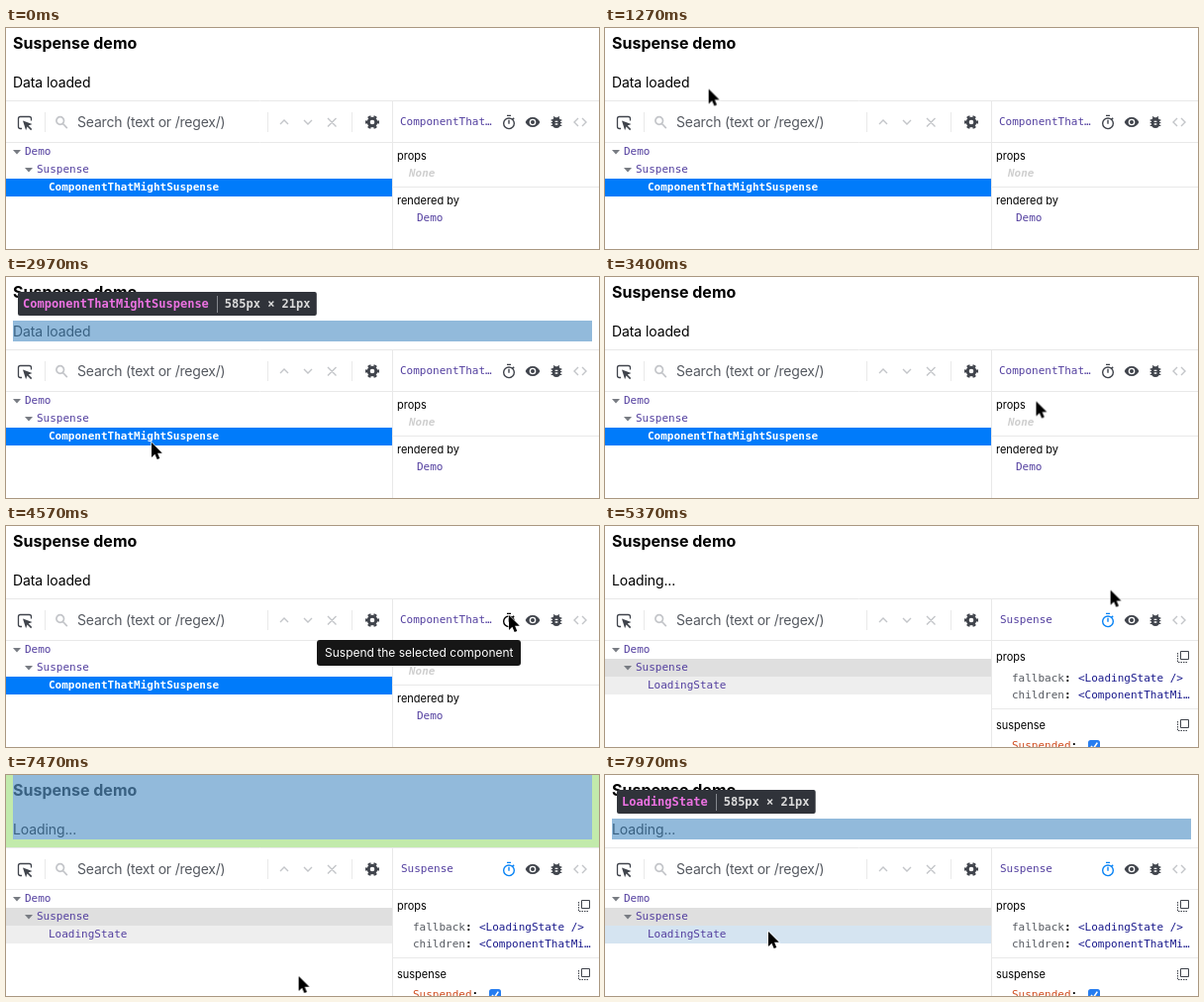
Recreate the animation shown at these times as an HTML page. Size 599 by 223 pixels, loop 8 s.

```html
<!DOCTYPE html>
<html lang="en">
<head>
<meta charset="utf-8">
<title>Suspense demo</title>
<style>
html, body { margin: 0; width: 100%; height: 100%; overflow: hidden; background: #fff; }
svg { display: block; width: 599px; height: 223px; }
text { white-space: pre; }
.sans { font-family: Inter, "Open Sans", sans-serif; font-size: 11px; }
.mono { font-family: "DejaVu Sans Mono", monospace; font-size: 11px; }
.name { fill: #533f9f; }
.value { fill: #1a1a8c; }
.line { fill: none; stroke: #e9e9e9; }
.dark { fill: #40444c; }
.icon { fill: none; stroke: #40444c; }
.faint { fill: none; stroke: #c3c5c9; }

/* One clock for everything: 8 s, percentages are ms / 80. */
.timed { animation: 8s step-end infinite; }
.loaded { animation-name: loaded; }
.loading { animation-name: loading; }
.arrow { animation-name: arrow; }
.ibeam { animation-name: ibeam; }
.demo-box { animation-name: demo-box; }
.demo-row { animation-name: demo-row; }
.suspense-hover { animation-name: suspense-hover; }
.component-hover { animation-name: component-hover; }
.state-hover { animation-name: state-hover; }
.hint { animation-name: hint; }
.watch { animation-name: watch; }
.cursor { animation: cursor 8s linear infinite; }

@keyframes loaded { 0% { visibility: visible } 60.375%, 100% { visibility: hidden } }
@keyframes loading { 0% { visibility: hidden } 60.375%, 100% { visibility: visible } }
@keyframes arrow {
  0%, 27.5%, 82.3% { visibility: hidden }
  10.375%, 32.75%, 86.5%, 100% { visibility: visible }
}
@keyframes ibeam {
  0%, 32.75%, 86.5%, 100% { visibility: hidden }
  27.5%, 82.3% { visibility: visible }
}
@keyframes demo-box {
  0%, 35.4%, 96.9%, 100% { visibility: hidden }
  34.5%, 92.25% { visibility: visible }
}
@keyframes demo-row {
  0%, 35.4%, 92.9%, 100% { visibility: hidden }
  34.5%, 92.25% { visibility: visible }
}
@keyframes suspense-hover { 0%, 36.1%, 100% { visibility: hidden } 35.4% { visibility: visible } }
@keyframes component-hover { 0%, 41.25%, 100% { visibility: hidden } 36.1% { visibility: visible } }
@keyframes state-hover { 0% { visibility: hidden } 96.9%, 100% { visibility: visible } }
@keyframes hint { 0%, 62.5%, 100% { visibility: hidden } 50.875% { visibility: visible } }
@keyframes watch { 0%, 100% { stroke: #40444c } 48.2% { stroke: #000 } }
@keyframes cursor {
  0%, 10.375% { transform: translate(206px, 6px) }
  12.2% { transform: translate(182px, 58px) }
  14% { transform: translate(130px, 70px) }
  17.125%, 27.1% { transform: translate(88px, 56px) }
  29.5% { transform: translate(32px, 59px) }
  31.625% { transform: translate(51px, 60px) }
  32.75% { transform: translate(68px, 74px) }
  34.5% { transform: translate(104px, 118px) }
  36.1% { transform: translate(136px, 154px) }
  37.125%, 37.5% { transform: translate(147px, 167px) }
  39.4% { transform: translate(245px, 164px) }
  41.25% { transform: translate(392px, 153px) }
  43.4% { transform: translate(466px, 106px) }
  45.375%, 47.5% { transform: translate(485px, 91px) }
  48.75%, 62% { transform: translate(508px, 90px) }
  67.875%, 73.75% { transform: translate(511px, 61px) }
  75% { transform: translate(450px, 57px) }
  78% { transform: translate(170px, 46px) }
  79.625%, 81.25% { transform: translate(85px, 45px) }
  81.625% { transform: translate(79px, 50px) }
  84.2% { transform: translate(36px, 58px) }
  86.5% { transform: translate(84px, 55px) }
  89.3% { transform: translate(220px, 66px) }
  91.625% { transform: translate(292px, 108px) }
  93.375% { transform: translate(296px, 203px) }
  95% { transform: translate(246px, 198px) }
  96.9% { transform: translate(190px, 169px) }
  99.625%, 100% { transform: translate(165px, 158px) }
}
</style>
</head>
<body>
<svg id="stage" viewBox="0 0 599 223"></svg>
<script>
const text = (x, y, content, cls = "mono", extra = "") =>
  `<text x="${x}" y="${y}" class="${cls}" ${extra}>${content}</text>`;
const rect = (x, y, w, h, fill, extra = "") =>
  `<rect x="${x}" y="${y}" width="${w}" height="${h}" fill="${fill}" ${extra}/>`;
const path = (d, cls, extra = "") => `<path d="${d}" class="${cls}" ${extra}/>`;
const timed = (cls, ...parts) => `<g class="timed ${cls}">${parts.join("")}</g>`;
const at = (x, y, scale, content) =>
  `<g transform="translate(${x} ${y}) scale(${scale})">${content}</g>`;

const bold = 'font-weight="700"';
const body = 'font-size="14" style="font-size:14px;letter-spacing:-.1px"';
const row = (y, fill) => rect(0, y, 390, 18, fill);
const hoverFill = "#d5e4f1";
const shade = "rgba(88,149,200,.65)";
const fold = (x, y) => path(`M${x} ${y}h8l-4 4.5z`, "", 'fill="#777b82"');

// Element highlight with the dark size label above it.
function highlight(name) {
  const split = 17 + name.length * 7.224 + 8;
  const label = 'style="font-size:12px" font-weight="700"';
  return rect(7, 44, 585, 21, shade) +
    rect(12, 15, split + 101 - 12, 24, "#30333a", 'rx="2"') +
    text(17, 31, name, "mono", `${label} fill="#ec72e2"`) +
    rect(Math.round(split), 19, 1, 17, "#85888e") +
    text(split + 8, 31, "585px × 21px", "mono", `${label} fill="#dcdcdc"`);
}

const stopwatch = (cls, extra = "") => at(500, 87, .667, path(
  "M9 2h6M12 8.5v6M18 7.5l1.8-1.8M20 14a8 8 0 1 1-16 0a8 8 0 1 1 16 0", cls,
  `stroke-width="2.1" ${extra}`));

const copyIcon = y => path(`M581.5 ${y}.5h8v8h-8z`, "icon") +
  path(`M578.5 ${y + 2}v9.5h9.5`, "icon", 'stroke-dasharray="1.5 1"');

const toolbar = [
  path("M0 73.5H599M0 115.5H599M390.5 73V223M39.5 85v20M264.5 85v20M349.5 85v20", "line"),
  path("M16 101.5h-1.5q-2 0-2-2v-8q0-2 2-2h9q2 0 2 2v2", "icon", 'stroke-width="1.3"'),
  path("M17 93.5l9.5 3.5-3.8 1.4 3.6 3.6-1.2 1.2-3.6-3.6-1.4 3.6z", "dark"),
  path("M58.5 93.5a3.8 3.8 0 1 1-7.6 0a3.8 3.8 0 1 1 7.6 0M57.5 96.5l4.3 4.6", "faint", 'stroke-width="1.7"'),
  text(72, 100, "Search (text or /regex/)", "sans", 'fill="#555960" style="font-size:14px;letter-spacing:-.2px"'),
  path("M277 97l4-4 4 4M301 93l4 4 4-4M325 91l8.5 8.5M333.5 91l-8.5 8.5", "faint", 'stroke-width="1.4"'),
  '<circle cx="370" cy="95" r="3.8" class="icon" stroke-width="3"/>',
  '<circle cx="370" cy="95" r="6" class="icon" stroke-width="2" pathLength="48" stroke-dasharray="4 4" stroke-dashoffset="2"/>',
  at(524, 87, .667, path("M12 4.5C7 4.5 2.73 7.6 1 12c1.73 4.4 6 7.5 11 7.5s9.27-3.1 11-7.5c-1.73-4.4-6-7.5-11-7.5zM12 17a5 5 0 1 1 0-10a5 5 0 1 1 0 10zm0-8a3 3 0 1 0 0 6a3 3 0 1 0 0-6z", "dark", 'fill-rule="evenodd"')),
  at(548, 87, .667,
    path("M4 9h16M4 13h16M4 17h16M7.7 3.7l3 3M16.3 3.7l-3 3", "icon", 'stroke-width="2"') +
    rect(6, 5, 12, 16, "#40444c", 'rx="6"') +
    path("M10 11h4M10 15h4", "", 'stroke="#fff" stroke-width="2"')),
  path("M578 91l-4 4 4 4M582 91l4 4-4 4", "faint", 'stroke-width="1.4"'),
];

const beforePanel = [
  text(398, 98, "ComponentThat…", "mono name"),
  stopwatch("timed watch", 'fill="none"'),
  text(395, 133, "props", "sans"),
  text(407, 150, "None", "mono", 'fill="#cfcfcf" font-style="italic" font-weight="700"'),
  path("M391 160.5H599", "line"),
  text(395, 178, "rendered by", "sans"),
  text(415, 195, "Demo", "mono name"),
];

const prop = (y, key, value) =>
  text(411, y, key, "mono", 'fill="#555960"') +
  text(411 + key.length * 6.62, y, ":", "mono", bold) +
  text(478, y, value, "mono value");

const afterPanel = [
  text(399, 98, "Suspense", "mono name"),
  stopwatch("", 'fill="none" stroke="#0a84f5"'),
  text(395, 136, "props", "sans"),
  copyIcon(126),
  prop(157, "fallback", "&lt;LoadingState /&gt;"),
  prop(174, "children", "&lt;ComponentThatMi…"),
  path("M391 184.5H599", "line"),
  text(395, 205, "suspense", "sans"),
  copyIcon(195),
  text(411, 225, "Suspended", "mono", 'fill="#d04d20"'),
  text(470.6, 225, ":", "mono", bold),
  rect(488, 216, 12, 12, "#267df0", 'rx="2.5"'),
  path("M491 222l2.3 2.6 4-6", "", 'fill="none" stroke="#fff" stroke-width="1.6"'),
];

document.getElementById("stage").innerHTML = [
  text(7, 21, "Suspense demo", "sans", `${bold} style="font-size:16px"`),
  timed("loaded", text(7, 60, "Data loaded", "sans", body), row(152, "#007bfa")),
  timed("loading", text(7, 60, "Loading...", "sans", body), row(134, "#dfdfdf"), row(152, "#eee")),
  timed("demo-row", row(116, hoverFill)),
  timed("suspense-hover", row(134, hoverFill), highlight("Suspense")),
  timed("component-hover", highlight("ComponentThatMightSuspense")),
  timed("state-hover", row(152, hoverFill), highlight("LoadingState")),
  timed("demo-box",
    path("M0 0H7V65H592V0H599V73H0z", "", 'fill="#c2eaab"'),
    rect(7, 0, 585, 65, shade)),
  ...toolbar,
  fold(7, 123), text(19, 128, "Demo", "mono name"),
  fold(19, 141), text(31, 146, "Suspense", "mono name"),
  timed("loaded", text(43, 164, "ComponentThatMightSuspense", "mono", `${bold} fill="#fff"`), ...beforePanel),
  timed("loading", text(43, 164, "LoadingState", "mono name"), ...afterPanel),
  timed("hint",
    rect(314, 115, 206, 26, "#161616", 'rx="3"'),
    text(322, 132, "Suspend the selected component", "sans", 'fill="#fff" style="font-size:12px"')),
  `<g class="cursor">${
    timed("arrow", path("M0 0V15l3.4-3.2 2.3 5.2 2.6-1.1-2.2-5.1h4.7z", "", 'stroke="#fff" stroke-width="1.2" paint-order="stroke"'))
  }${
    timed("ibeam", path("M-3-6.5q3 0 3 2v9.500q0 2-3 2M3-6.500q-3 0-3 2M3 7q-3 0-3-2M-1.500 2h3", "", 'fill="none" stroke="#000" stroke-width="1.2"'))
  }</g>`,
].join("");
</script>
</body>
</html>
```
